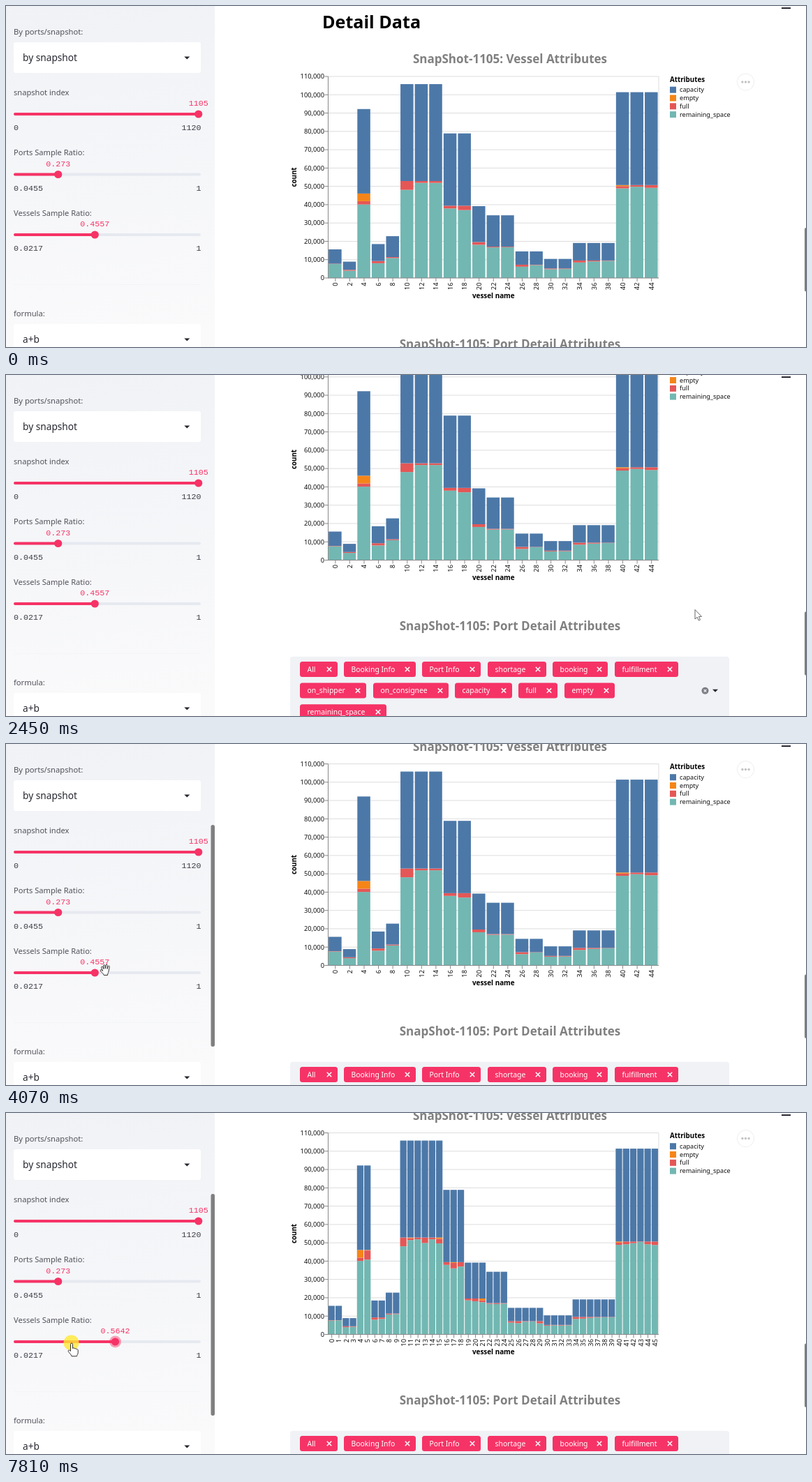
An HTML page with a canvas for the animation above (8000 ms loop, 1146x489 px).

```html
<!DOCTYPE html>
<html lang="en">
<head>
<meta charset="utf-8">
<title>Vessel dashboard</title>
<style>
html, body { margin: 0; width: 100%; height: 100%; overflow: hidden; background: #fff; }
canvas { display: block; }
</style>
</head>
<body>
<canvas id="stage" width="1146" height="489"></canvas>
<script>
const ctx = document.getElementById('stage').getContext('2d');
const LOOP = 8000;
const SANS = '"Noto Sans", "Open Sans", sans-serif';
const MONO = '"Liberation Mono", monospace';
const PINK = '#f63366', INK = '#262730';

// Vessel classes: [ships, capacity in thousands]
const CLASSES = [[2, 7.8], [2, 4.45], [2, 46.1], [2, 9.25], [2, 11.4], [6, 52.9], [3, 39.45],
  [3, 19.6], [3, 17.1], [5, 7.25], [4, 5.2], [6, 9.55], [6, 50.7]];
const FULL = [.2, .1, .5, .3, 1.8, 5, 1.2, .8, .5, .3, 4.8, 1, 1, 3, 1, 2.5, 1.5, 3, 2.4, 1, 1.5, 1,
  .4, .5, .3, .8, 1.1, .3, .2, 1.2, .4, .2, .3, .2, 1.1, .9, .5, .3, .2, .2, 1.2, 1.5, .9, .2, 1.5, 1.9];
const EMPTY = { 4: 4.2, 5: .3, 11: .4, 15: .7, 17: .4, 21: 1, 40: .6 };
const VESSELS = CLASSES.flatMap(([n, capacity]) => Array(n).fill(capacity)).map((capacity, id) => {
  const full = FULL[id], empty = EMPTY[id] || 0;
  return { id, capacity, full, empty, remaining_space: capacity - full - empty };
});
const COLORS = { capacity: '#4c78a8', empty: '#f58518', full: '#e45756', remaining_space: '#72b7b2' };
const STACK = Object.keys(COLORS).reverse();

// Tag rows: [label, left, right]
const TAGS = [
  [['All', 421, 475], ['Booking Info', 484, 587], ['Port Info', 596, 680], ['shortage', 690, 774],
    ['booking', 783, 862], ['fulfillment', 872, 963]],
  [['on_shipper', 421, 516], ['on_consignee', 526, 634], ['capacity', 643, 725], ['full', 734, 790],
    ['empty', 800, 872]],
  [['remaining_space', 421, 545]]
];

const CURSORS = {
  arrow: { hot: [0, 0], path: 'M.5.5V14L3.6 11.2 5.8 16 8 15 5.9 10.4H10Z' },
  pointer: { hot: [5, 0], path: 'M4.5 12V2a1.5 1.5 0 0 1 3 0v6c1-1 2.6-.6 2.8.5c1-.7 2.4-.3 2.6.8c1.2-.4 2.3.2 2.3 1.5v3.5c0 2-1.7 3-1.7 5H6c0-2-4-5-4.8-7.2c-.4-1.3 1.2-2 2-1.2z' },
  grab: { hot: [8, 8], path: 'M4.6 10L2.6 5.2c-.5-1.6 1.5-2.2 2.1-.8L6 7.2 5.6 2.4c-.1-1.6 2-1.7 2.2-.2L8.3 6.6 9 1.8c.2-1.5 2.2-1.3 2.1.2L11 7l1.4-3.6c.6-1.3 2.3-.7 1.9.7L13 10.5c-.4 2.4-1.5 3-1.5 5.5H6.2c0-2-3.4-3.6-5-6.4C.6 8.2 2.3 7.8 3 8.6z' },
  grabbing: { hot: [8, 10], path: 'M4 8.5V6c0-1.6 1.9-1.7 2.2-.6C6.4 4 8.2 4 8.5 5.2 9 4.2 10.6 4.4 10.8 5.6 11.6 4.9 13 5.3 13 6.7v4.1c0 2-1.4 2.6-1.4 4.7H6c0-1.9-2.8-2.8-3.2-5.2C2.5 8.8 3.2 8.2 4 8.5z' }
};
for (const c of Object.values(CURSORS)) c.shape = new Path2D(c.path);

// Motion tables: [start, end, steps, ...target]
const SCROLL = [[1680, 1830, 3, -24.5], [1990, 2140, 3, -131], [2450, 3050, 9, -72.5]];
const POINTER = [[390, 750, 6, 948, 300], [816, 1050, 4, 986.5, 336], [3520, 4070, 8, 142, 323.5],
  [4630, 4940, 5, 157, 329], [6720, 7500, 11, 93, 329.5]];
const PRESSES = [[5310, 5530], [6470, 6720], [7550, LOOP]];
const SLIDE_AT = 6470, RELOAD_AT = 7150;

function follow(table, start, t) {
  let pos = start;
  for (const [t0, t1, n, ...target] of table) {
    if (t < t0) break;
    const step = Math.floor((t - t0) / (t1 - t0) * (n - 1) + 1e-6) + 1;
    const k = Math.min(1, step / n);
    pos = pos.map((v, i) => v + (target[i] - v) * k);
  }
  return pos;
}

function text(str, x, y, size, { color = INK, weight = 400, align = 'left', family = SANS } = {}) {
  ctx.font = `${weight} ${size}px ${family}`;
  ctx.fillStyle = color;
  ctx.textAlign = align;
  ctx.fillText(str, x, y);
}

function upright(str, x, y, size, options) {
  ctx.save();
  ctx.translate(x, y);
  ctx.rotate(-Math.PI / 2);
  text(str, 0, 0, size, options);
  ctx.restore();
}

function box(x, y, w, h, color, r = 0) {
  ctx.fillStyle = color;
  ctx.beginPath();
  ctx.roundRect(x, y, w, h, r);
  ctx.fill();
}

function disc(x, y, r, color) {
  ctx.fillStyle = color;
  ctx.beginPath();
  ctx.arc(x, y, r, 0, 7);
  ctx.fill();
}

function line(x1, y1, x2, y2, color, width = 1) {
  ctx.strokeStyle = color;
  ctx.lineWidth = width;
  ctx.beginPath();
  ctx.moveTo(x1, y1);
  ctx.lineTo(x2, y2);
  ctx.stroke();
}

function cross(x, y, r, color, width) {
  line(x - r, y - r, x + r, y + r, color, width);
  line(x - r, y + r, x + r, y - r, color, width);
}

function caret(x, y) {
  ctx.fillStyle = INK;
  ctx.fill(new Path2D(`M${x - 4} ${y - 2}h8l-4 4z`));
}

function drawChart(ships, active) {
  const left = 461.5, right = 935, top = 101, base = 390;
  const unit = (base - top) / 110, step = (right - left) / ships.length;
  const barLeft = left - .4;

  for (let k = 0; k <= 110; k += 10) {
    const y = base - k * unit;
    line(left, y, right, y, '#ddd');
    line(left - 5, y, left, y, '#888');
    text(k ? `${k},000` : '0', 456, y + 3.3, 9.3, { align: 'right', color: '#111' });
  }
  line(right, top, right, base, '#ddd');

  ships.forEach((ship, i) => {
    let y = base;
    for (const key of STACK) {
      const h = ship[key] * unit;
      ctx.fillStyle = COLORS[key];
      ctx.fillRect(barLeft + step * (i + .05), y - h, step * .9, h);
      y -= h;
    }
    const x = left + step * (i + .5);
    line(x, base, x, base + 5, '#888');
    upright(ship.id, x + 3.3, base + 6.5, 9.3, { align: 'right', color: '#111' });
  });
  line(left, top, left, base + .5, '#888');
  line(left, base, right, base, '#888');

  const bold = { weight: 700, color: '#000' };
  text('vessel name', 698.3, base + 28.7, 9.9, { ...bold, align: 'center' });
  upright('count', 416, (top + base) / 2, 9.8, { ...bold, align: 'center' });

  text('Attributes', 951, 108.5, 9.75, bold);
  Object.entries(COLORS).forEach(([name, color], i) => {
    const y = 120 + i * 11.8;
    box(951, y - 4.3, 9, 9, color);
    text(name, 965, y + 3.2, 9.15, { color: '#111' });
  });

  disc(1059.5, 109, 12.5, active ? '#aaa' : '#eee');
  disc(1059.5, 109, 11.5, '#fff');
  for (const dx of [-4.6, 0, 4.6]) disc(1059.5 + dx, 109, 1.7, active ? '#111' : '#c4c4c4');
}

function drawTags() {
  box(407, 528.3, 629, 110, '#f0f2f6', 4);
  TAGS.forEach((row, r) => {
    const y = 546.5 + r * 30.6;
    for (const [label, x1, x2] of row) {
      box(x1, y - 11, x2 - x1, 22, PINK, 3.5);
      text(label, x1 + 10.5, y + 3.7, 10.4, { color: '#fff' });
      cross(x2 - 12, y, 3.2, '#fff', 1.5);
    }
  });
  disc(1001.5, 577.3, 5, '#7b7d84');
  cross(1001.5, 577.3, 1.8, '#f0f2f6', 1.2);
  caret(1016, 577.3);
}

function drawMain(offset, ships, active) {
  const title = { weight: 600, color: '#808080', align: 'center' };
  ctx.save();
  ctx.translate(0, offset);
  text('Detail Data', 453, 32, 25.1, { weight: 700, color: '#000' });
  text('SnapShot-1105: Vessel Attributes', 722, 82, 17, title);
  drawChart(ships, active);
  text('SnapShot-1105: Port Detail Attributes', 722, 490.5, 17, title);
  drawTags();
  ctx.restore();
  box(1111, 2, 13, 2, INK);
  box(1144, 318 - offset * .171, 4, 91.5, '#7f7f7f', 2);
}

function drawSelect(label, value, y) {
  text(label, 11, y, 11.2, { color: '#50515a' });
  box(11, y + 11, 268, 44, '#fff', 3);
  text(value, 24, y + 38, 13.7);
  caret(259.3, y + 33.5);
}

function drawSlider(label, y, x, value, min, max, focused) {
  const mono = { family: MONO, color: '#3c3d46' };
  text(label, 11, y - 27.5, 11.1, { color: '#50515a' });
  text(value, x, y - 12, 11.7, { ...mono, color: PINK, align: 'center' });
  box(11, y - 2, 268, 4, '#e6e9f0', 2);
  box(11, y - 2, x - 11, 4, PINK, 2);
  if (focused) disc(x, y, 8.5, 'rgba(246,51,102,.45)');
  disc(x, y, 5.6, PINK);
  text(min, 11, y + 23, 11.7, mono);
  text(max, 279.5, y + 23, 11.7, { ...mono, align: 'right' });
}

function drawSidebar(moved, hovered) {
  const shade = ctx.createLinearGradient(0, 0, 60, 489);
  shade.addColorStop(0, '#f0f2f6');
  shade.addColorStop(1, '#fafafb');
  ctx.fillStyle = shade;
  ctx.fillRect(0, 0, 299, 489);
  drawSelect('By ports/snapshot:', 'by snapshot', 41);
  drawSlider('snapshot index', 155, 275.7, '1105', '0', '1120');
  drawSlider('Ports Sample Ratio:', 241.5, 74.7, '0.273', '0.0455', '1');
  drawSlider('Vessels Sample Ratio:', 328, moved ? 156.5 : 127.3, moved ? '0.5642' : '0.4557', '0.0217', '1', moved);
  line(11, 399.5, 279, 399.5, '#f4f5f7');
  drawSelect('formula:', 'a+b', 445);
  if (hovered) box(293.5, 116, 5.5, 318, '#7f7f7f', 2.7);
}

function drawCursor(t, x, y) {
  const pressed = PRESSES.some(([a, b]) => t >= a && t < b);
  const held = t >= 6470 && t < 6720;
  const kind = x > 165 ? 'arrow' : t < 4630 ? 'grab' : held ? 'grabbing' : 'pointer';
  const { hot, shape } = CURSORS[kind];
  if (pressed) disc(x + .5, y, 11, 'rgba(255,232,50,.8)');
  ctx.save();
  ctx.translate(x - hot[0], y - hot[1]);
  ctx.fillStyle = held ? '#fff27a' : '#fff';
  ctx.strokeStyle = held ? '#6b5f10' : kind === 'arrow' ? '#666' : '#333';
  ctx.lineWidth = 1;
  ctx.lineJoin = 'round';
  ctx.fill(shape);
  ctx.stroke(shape);
  ctx.restore();
}

function draw(t) {
  const [offset] = follow(SCROLL, [0], t);
  const [x, y] = follow(POINTER, [1152, 250], t);
  const shown = t >= 390;
  const ships = t < RELOAD_AT ? VESSELS.filter(v => v.id % 2 === 0) : VESSELS;
  ctx.fillStyle = '#fff';
  ctx.fillRect(0, 0, 1146, 489);
  drawMain(offset, ships, shown && x > 407 && x < 1075);
  drawSidebar(t >= SLIDE_AT, shown && x < 299);
  if (shown) drawCursor(t, x, y);
}

const begin = performance.now();
function tick() {
  draw((performance.now() - begin) % LOOP);
  requestAnimationFrame(tick);
}
tick();
</script>
</body>
</html>
```
